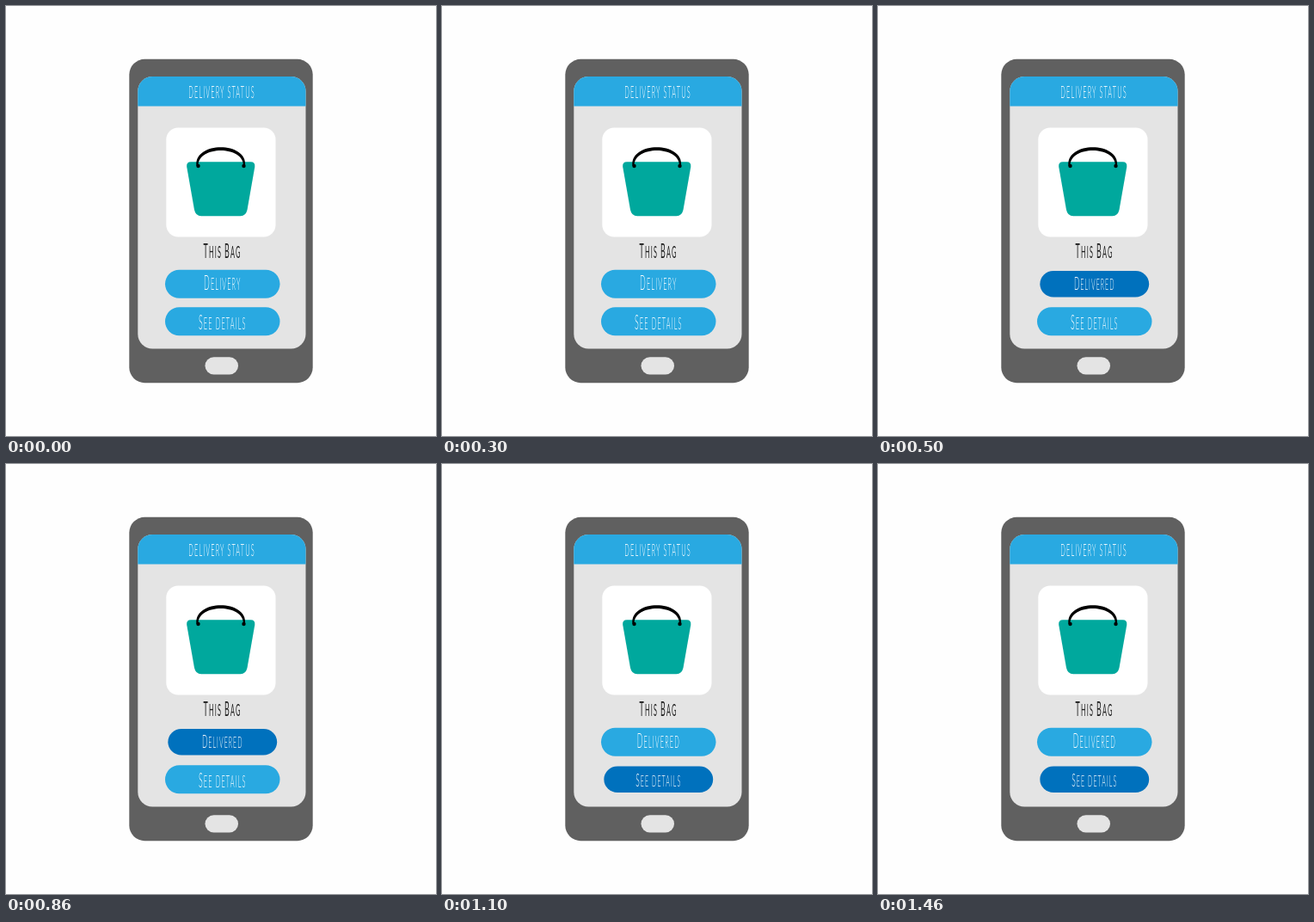
An HTML page for the animation above (1700 ms loop, 500 by 500 pixels).

```html
<!DOCTYPE html>
<html lang="en">
<head>
<meta charset="utf-8">
<title>Delivery status</title>
<style>
  html, body { margin: 0; width: 100%; height: 100%; overflow: hidden; background: #fefefe; }
  svg { display: block; width: 500px; height: 500px; }
  text {
    font: 300 19px Lato, "Open Sans", sans-serif;
    letter-spacing: 3px;
    text-anchor: middle;
    text-transform: uppercase;
    fill: #fff;
    transform: scaleX(.385); /* one condensed look for all lettering */
  }
  .cap { font-size: 23px; }
  .dark { font-weight: 400; fill: #222; }
  .button rect { fill: #29a9e1; }
  .pressed rect { fill: #0071bd; }
</style>
</head>
<body>
<svg viewBox="0 0 500 500">
  <rect x="143.300" y="61.800" width="213.400" height="376.400" rx="18" fill="#606060"/>
  <rect x="153.300" y="82" width="195.200" height="316.500" rx="17" fill="#e4e4e4"/>
  <path d="M153.300 116.600V99a17 17 0 0 1 17-17H331.500a17 17 0 0 1 17 17V116.600Z" fill="#29a9e1"/>
  <rect x="231.500" y="408.200" width="38.500" height="20.300" rx="10.150" fill="#e4e4e4"/>
  <rect x="186.300" y="141.500" width="127.200" height="127" rx="14" fill="#fff"/>

  <path d="M215 181.300H284.500Q290 181.300 289.300 187L280.500 237Q279 244.300 272.500 244.300H227Q220.500 244.300 219 237L210.200 187Q209.500 181.300 215 181.300Z" fill="#00a89d"/>
  <path d="M221.500 186C218 157 281.500 157 278 186H276C277 162 222.500 162 223.500 186Z"/>
  <circle cx="223.500" cy="186" r="2.200"/>
  <circle cx="276.500" cy="186" r="2.200"/>

  <g transform="translate(251 107)"><text>delivery status</text></g>
  <g transform="translate(251.500 292.500)">
    <text class="dark"><tspan class="cap">T</tspan>his <tspan class="cap">B</tspan>ag</text>
  </g>

  <g class="button" id="delivery">
    <rect x="-66.750" y="-16.500" width="133.500" height="33" rx="16.500"/>
    <text y="7"><tspan class="cap">D</tspan><tspan id="status">elivery</tspan></text>
  </g>
  <g class="button" id="details">
    <rect x="-66.750" y="-16.500" width="133.500" height="33" rx="16.500"/>
    <text y="9.500"><tspan class="cap">S</tspan>ee details</text>
  </g>
</svg>
<script>
  const LOOP = 1700, DELIVERED_AT = 500, DETAILS_AT = 1100;
  const [delivery, details, status] =
    ["delivery", "details", "status"].map(id => document.getElementById(id));

  function setButton(button, y, pressed) {
    button.classList.toggle("pressed", pressed);
    button.setAttribute("transform",
      `translate(251.750 ${y})` + (pressed ? " scale(.95 .92)" : ""));
  }

  const start = performance.now();
  function draw() {
    const t = (performance.now() - start) % LOOP;
    setButton(delivery, 323.25, t >= DELIVERED_AT && t < DETAILS_AT);
    setButton(details, 366.75, t >= DETAILS_AT);
    status.textContent = t < DELIVERED_AT ? "elivery" : "elivered";
    requestAnimationFrame(draw);
  }
  draw();
</script>
</body>
</html>
```
